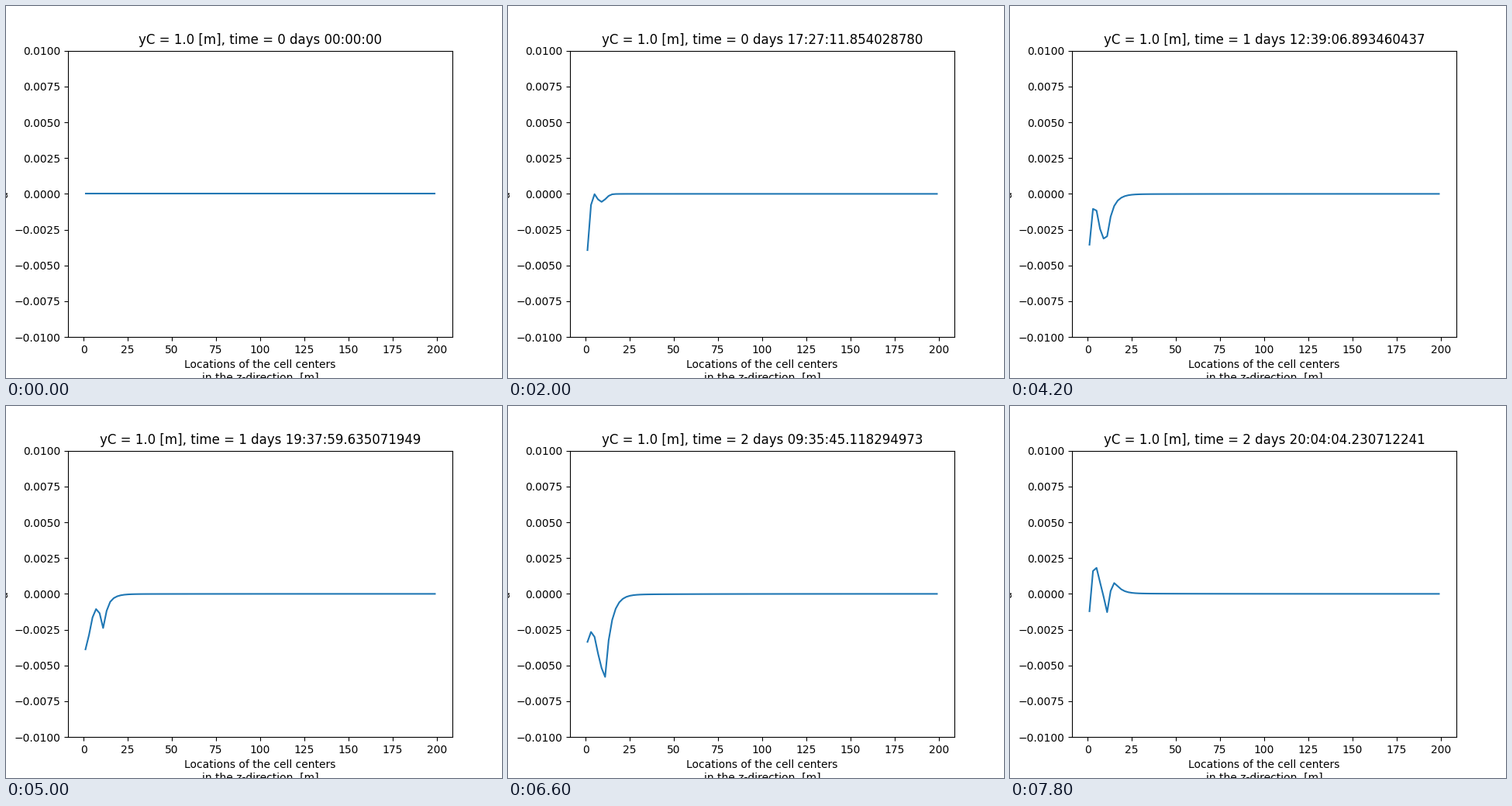
A matplotlib script for the animation above (8000 ms loop, 640 px wide and 480 px high).

```python
import numpy as np
import matplotlib.pyplot as plt
from matplotlib.animation import FuncAnimation

FRAMES, INTERVAL = 40, 200
STEP_NS = 6283185402877.975     # simulated nanoseconds per frame
PERIOD, PHASE = 10, 2.8         # inertial cycle in frames
CREST = 11                      # height of the kink in metres
Z = np.arange(1, 200, 2.0)


def spike(center, rate):
    return np.exp(-rate * (np.abs(Z - center) / 2) ** 1.5)


def ramp(i, start, end):
    s = np.clip((i - start) / (end - start), 0, 1)
    return s * s * (3 - 2 * s)


# Shape of the swing: rises to the crest, then decays into a faint far tail
above = np.maximum(Z - CREST, 0)
decay = np.exp(-above / 3.4) + 0.01 * np.exp(-above / 40)
swing = np.minimum(Z / CREST, 1) ** 0.9 * decay
eddy = np.where(Z < CREST, np.sin(2 * np.pi * Z / CREST), 0)
kink = spike(CREST, 1.05)


def velocity(i):
    angle = 2 * np.pi * (i - PHASE) / PERIOD
    cos, sin = np.cos(angle), np.sin(angle)
    grown = ramp(i, 8, 13)

    drag = -(43 - 0.013 * i**2) * (1 - np.exp(-i / 1.5))
    layer = spike(Z[0], 0.9 - 0.35 * sin * min(i / 10, 1))
    tide = -grown * (8 + (30 + 0.6 * i) * cos)
    pinch = -grown * (16 + 1.1 * i) * ((1 - cos) / 2) ** 2
    curl = i * (0.15 - 0.3 * sin)
    return 1e-4 * (drag * layer + tide * swing + pinch * kink + curl * eddy)


def clock(i):
    secs, ns = divmod(round(i * STEP_NS), 10**9)
    days, secs = divmod(secs, 86400)
    text = f"{days} days {secs // 3600:02d}:{secs // 60 % 60:02d}:{secs % 60:02d}"
    return text + (f".{ns:09d}" if ns else "")


fig, ax = plt.subplots(figsize=(6.4, 4.8), dpi=100)
line, = ax.plot(Z, velocity(0))
ax.set_ylim(-0.01, 0.01)
ax.set_xlabel("Locations of the cell centers\nin the z-direction. [m]")
ax.set_ylabel("u")
title = ax.set_title("")


def draw(i):
    line.set_ydata(velocity(i))
    title.set_text(f"yC = 1.0 [m], time = {clock(i)}")
    return line, title


anim = FuncAnimation(fig, draw, frames=FRAMES, interval=INTERVAL,
                     repeat=True, repeat_delay=0)
plt.show()
```
